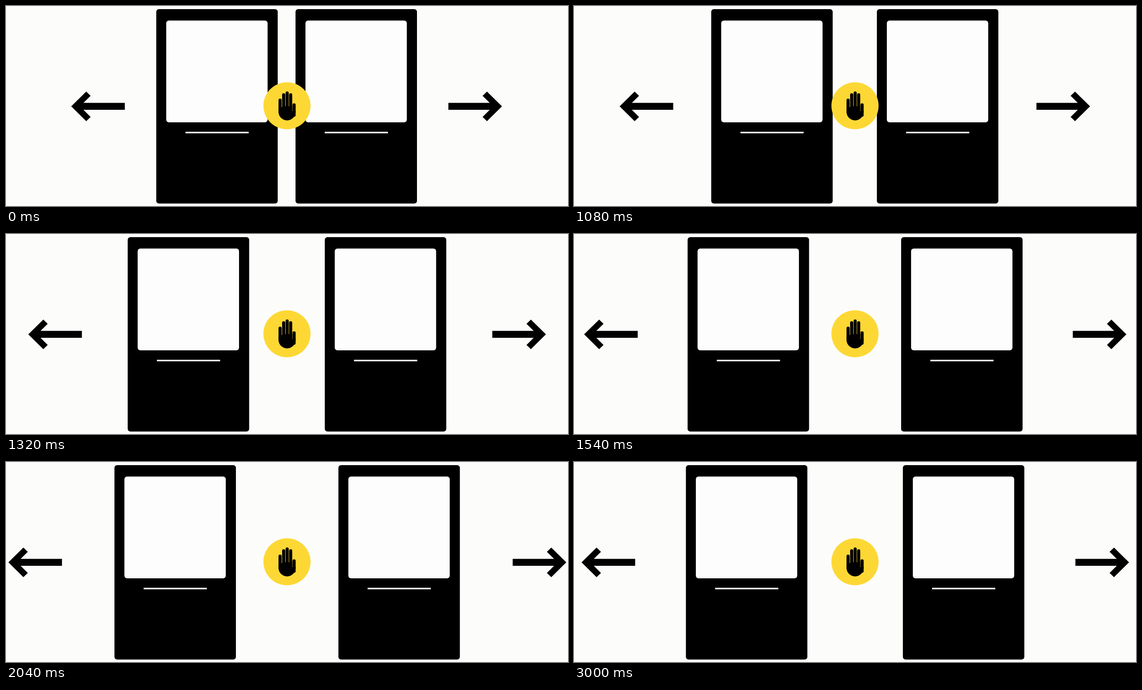
An HTML page for the animation above (3020 ms loop, 1254 by 447 pixels).

```html
<!DOCTYPE html>
<html lang="en">
<head>
<meta charset="utf-8">
<title>Sliding doors</title>
<style>
  html, body { margin: 0; width: 100%; height: 100%; overflow: hidden; background: #fcfcfb; }
  svg { display: block; width: 100%; height: 100%; }
</style>
</head>
<body>
<svg viewBox="0 0 1254 447">
  <defs>
    <g id="door">
      <rect y="7.1" width="271" height="434.4" rx="6"/>
      <rect x="22.2" y="32.6" width="226.2" height="227.4" rx="6" fill="#fdfdfd"/>
      <rect x="65.2" y="281.1" width="141" height="3.4" fill="#fdfdfd"/>
    </g>
    <path id="arrow" d="M0 224.3 33.5 191.3 43.3 200.8 27.3 216.6H119.6V231.9H27.3L43.3 247.9 33.5 257.4Z"/>
  </defs>

  <use id="doorL" href="#door"/>
  <use id="doorR" href="#door"/>
  <use id="arrowL" href="#arrow"/>
  <use id="arrowR" href="#arrow"/>

  <circle cx="627" cy="223" r="52.6" fill="#fdd835"/>
  <g id="hand">
    <rect x="608.1" y="207" width="7" height="34" rx="3.5"/>
    <rect x="616.1" y="195" width="6.9" height="40" rx="3.4"/>
    <rect x="623.9" y="191" width="6.9" height="40" rx="3.4"/>
    <rect x="631.7" y="195" width="6.9" height="40" rx="3.4"/>
    <rect x="639.4" y="217.4" width="6.9" height="30" rx="3.4"/>
    <path d="M608.1 226H616V224H638.6V234.5H646.3V236.6A19.1 19.1 0 0 1 608.1 236.6Z"/>
  </g>
</svg>

<script>
const LOOP = 3020, STEP = 20;
const OPEN = { start: 822, length: 1180, curve: [.25, .1, .3, 1] };
const CLOSE = { start: 2945, length: 600, curve: [.25, .1, .25, 1] };

// Each part slides horizontally from one x to another.
const parts = [
  { id: 'doorL', from: 335.3, to: 242 },
  { id: 'doorR', from: 646, to: 741.7 },
  { id: 'arrowL', from: 145.5, to: 5.3 },
  { id: 'arrowR', from: 1106.7, to: 1250.2, flip: true }
].map(p => ({ ...p, el: document.getElementById(p.id) }));

const cubic = (a, b, s) =>
  3 * a * s * (1 - s) ** 2 + 3 * b * s * s * (1 - s) + s ** 3;

function bezier([x1, y1, x2, y2], x) {
  let lo = 0, hi = 1;
  for (let i = 0; i < 24; i++) {
    const mid = (lo + hi) / 2;
    if (cubic(x1, x2, mid) < x) lo = mid; else hi = mid;
  }
  return cubic(y1, y2, (lo + hi) / 2);
}

function progress({ start, length, curve }, t) {
  const x = (t - start) / length;
  return x <= 0 ? 0 : x >= 1 ? 1 : bezier(curve, x);
}

function draw(t) {
  const open = progress(OPEN, t) - progress(CLOSE, t);
  for (const { el, from, to, flip } of parts) {
    const x = from + (to - from) * open;
    el.setAttribute('transform', `translate(${x.toFixed(2)} 0)${flip ? ' scale(-1 1)' : ''}`);
  }
}

const origin = performance.now();

function tick() {
  const t = (performance.now() - origin) % LOOP;
  draw(Math.floor(t / STEP) * STEP);
  requestAnimationFrame(tick);
}

tick();
</script>
</body>
</html>
```
